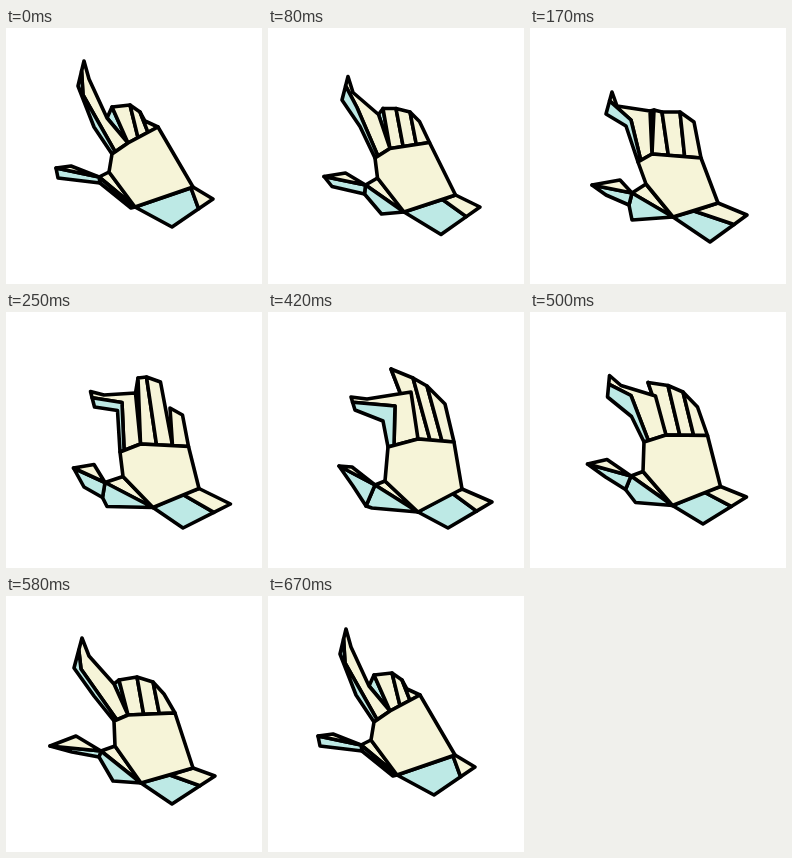
These frames come from a looping animation (256x256 px, 710 ms). An HTML page:

```html
<!DOCTYPE html>
<html lang="en">
<head>
<meta charset="utf-8">
<title>Hand</title>
<style>
html, body { margin: 0; height: 100%; overflow: hidden; background: #fff; }
svg { display: block; width: 100%; height: 100%; }
polygon { stroke: #000; stroke-width: 3.6; stroke-linejoin: round; }
</style>
</head>
<body>
<svg id="stage" viewBox="0 0 256 256"></svg>
<script>
const CREAM = '#f6f4d8', BLUE = '#bde9e5';

const lerp = (p, q, t) => p.map((v, i) => v + (q[i] - v) * t);
const points = text => text.split(' ').map(p => p.split(',').map(Number));

// Key points of a hand, by part; all facets are built from these.
const hand = (palm, index, knuckles, thumb, wrist) =>
  [palm, index, knuckles, thumb, wrist].map(points);
const between = (a, b) => a.map((part, i) => part.map((p, j) => lerp(p, b[i][j], 0.5)));

const point = hand(
  '106,126 122,115 152,99 187,159 129,179 103,144',
  '78,33 83,51 101,90 77,67 72,58 88,99',
  '106,79 124,77 134,84 134,84 139,93',
  '50,140 65,138 93,149 94,155 52,150 125,180',
  '185,160 207,171 166,199');
const curl = hand(
  '108,134 122,126 171,130 188,175 143,189 116,156',
  '82,64 87,78 120,83 101,92 76,86 96,98',
  '124,82 132,84 150,84 150,84 164,94',
  '62,157 90,152 102,165 99,177 76,167 102,192',
  '164,183 217,187 180,214');
const spread = hand(
  '120,146 147,138 194,139 198,178 151,202 118,173',
  '87,95 109,88 139,79 131,89 101,104 127,99',
  '140,50 149,46 159,56 178,108 189,112',
  '73,155 86,153 96,176 94,194 80,183 100,197',
  '188,181 232,197 174,218');
const close = hand(
  '120,135 150,127 186,130 194,177 150,200 117,169',
  '83,85 99,87 143,80 127,94 87,98 115,109',
  '123,57 145,66 159,74 159,74 177,92',
  '71,154 84,155 107,173 98,194 85,174 104,196',
  '184,181 224,190 180,216');
const rise = hand(
  '108,125 122,119 169,117 187,172 135,187 109,150',
  '76,42 83,60 108,88 75,73 68,72 88,100',
  '113,84 131,81 147,86 147,86 158,98',
  '44,150 70,140 95,155 93,161 66,156 107,185',
  '164,179 209,180 166,208');

function facets([palm, index, knuckles, thumb, wrist]) {
  const [indexBase, web, littleBase, heel, wristIn, thumbRoot] = palm;
  const [tip, front, knuckle, ridge, back, bend] = index;
  const [k0, k1, k2, k3, k4] = knuckles;
  const [thumbTip, thumbTop, jointTop, jointLow, pad, root] = thumb;
  const [bevel, cuffRight, cuffLow] = wrist;

  const ridgeTop = lerp(tip, back, 0.4), ridgeBase = lerp(indexBase, web, 0.2);
  const cuffBevel = lerp(cuffLow, cuffRight, 0.65);
  const base = i => lerp(web, littleBase, i / 3);
  const fingers = [[k0, k1], [k1, k2], [k3, k4]].map(
    ([left, right], i) => [CREAM, left, right, base(i + 1), base(i)]);

  return [
    [BLUE, knuckle, k0, web],
    ...fingers,
    [CREAM, tip, front, knuckle, web, ridgeBase, ridge, ridgeTop],
    [BLUE, ridgeTop, back, bend, indexBase, ridgeBase, ridge],
    [CREAM, jointTop, thumbRoot, wristIn],
    [BLUE, jointTop, wristIn, root, jointLow],
    [BLUE, thumbTip, jointTop, jointLow, pad],
    [CREAM, thumbTip, thumbTop, jointTop],
    [BLUE, wristIn, bevel, cuffBevel, cuffLow],
    [CREAM, bevel, heel, cuffRight, cuffBevel],
    [CREAM, ...palm]
  ];
}

const LOOP = 710;
const steps = [
  [0, point], [80, between(point, curl)], [170, curl], [250, between(curl, spread)],
  [330, spread], [420, close], [500, between(close, rise)], [580, rise], [670, point]
];

const stage = document.getElementById('stage');
const start = performance.now();
let shown;

function tick() {
  const t = (performance.now() - start) % LOOP;
  const pose = steps.findLast(([from]) => t >= from)[1];
  if (pose !== shown) {
    stage.innerHTML = facets(pose)
      .map(([fill, ...corners]) => `<polygon fill="${fill}" points="${corners.join(' ')}"/>`)
      .join('');
    shown = pose;
  }
  requestAnimationFrame(tick);
}
tick();
</script>
</body>
</html>
```
